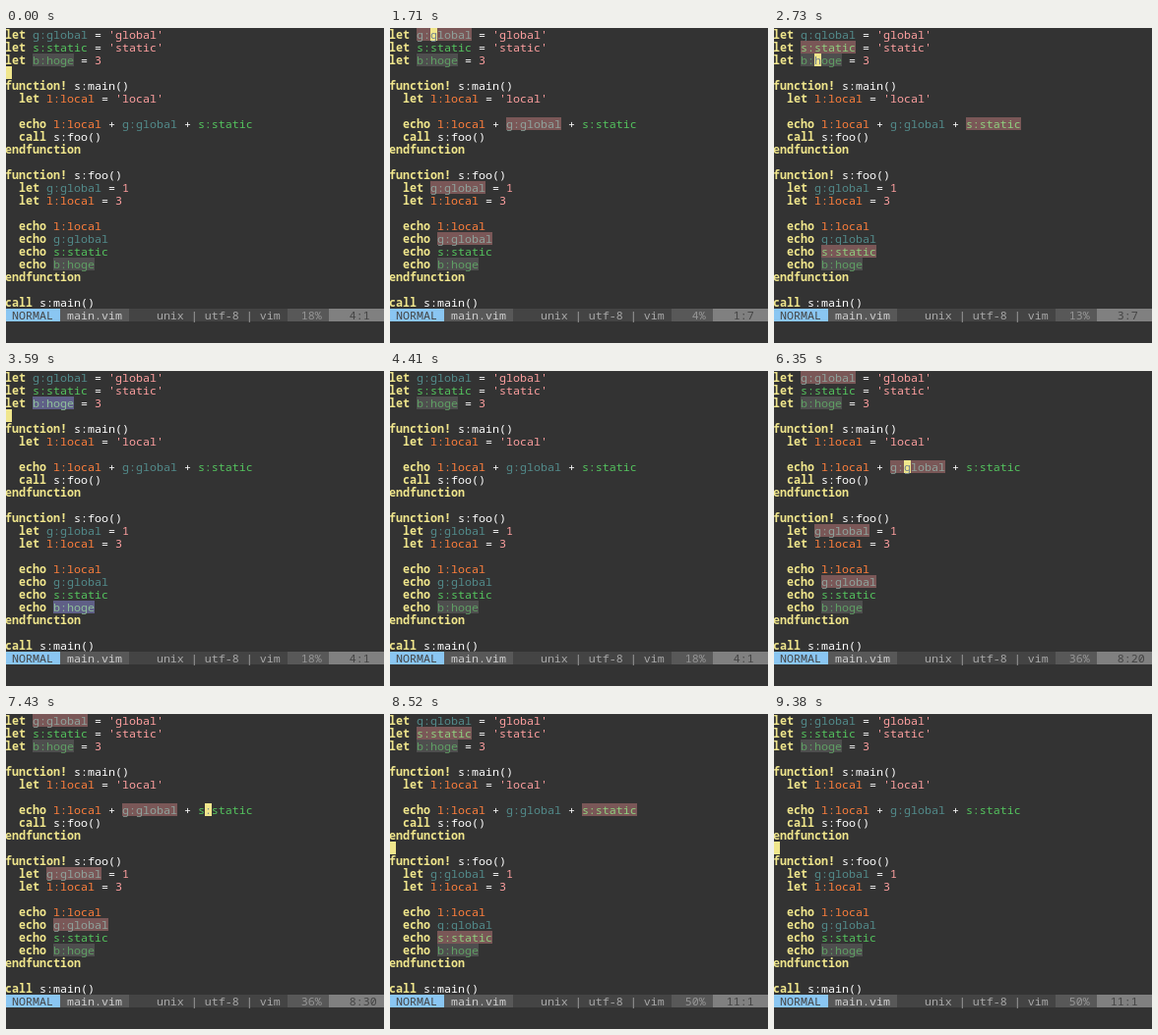
Animation of 384x321 px, one loop 9.71 s. Source, as an HTML page:

```html
<!DOCTYPE html>
<html lang="en">
<head>
<meta charset="utf-8">
<title>Vim variable highlighting</title>
<style>
html, body { margin: 0; width: 100%; height: 100%; overflow: hidden; background: #333; }
pre { position: absolute; left: -1px; margin: 0; color: #fff; white-space: pre;
  font: 11.6667px/13px "Noto Sans Mono", "DejaVu Sans Mono", monospace; }
span { display: inline-block; height: 13px; vertical-align: top; }
.key { color: #f0e68c; font-weight: bold; }
.lit { color: #ffa0a0; }
.g { color: #528b8b; }
.s { color: #54c45e; }
.l { color: #ff7f3c; }
.b { color: #5f9f64; background: #4e4e4e; }
.on { background: #7a5757; }
.g.on { color: #8fa39c; }
.s.on { color: #8fd07f; }
.b.on { background: #5f5f87; color: #8fc09a; }
#cursor { background: #f0e68c; color: #708090; width: 7px; height: 13px; }
#status { top: 286px; }
.mode { background: #8ac6f2; color: #444; }
.file { background: #585858; color: #d0d0d0; }
.info { background: #444; color: #a8a8a8; }
.percent { background: #585858; color: #969696; }
.place { background: #808080; color: #444; }
</style>
</head>
<body>
<pre id="code"></pre>
<pre id="cursor"></pre>
<pre id="status"><span class="mode"> NORMAL </span><span class="file"> main.vim </span><span class="info">    unix | utf-8 | vim </span><span class="percent"></span><span class="place"></span></pre>
<script>
const lines = `let g:global = 'global'
let s:static = 'static'
let b:hoge = 3

function! s:main()
  let l:local = 'local'

  echo l:local + g:global + s:static
  call s:foo()
endfunction

function! s:foo()
  let g:global = 1
  let l:local = 3

  echo l:local
  echo g:global
  echo s:static
  echo b:hoge
endfunction

call s:main()`.split('\n');

const LOOP = 9710;
// [time, line, column, highlighted scope, cursor hidden]
const steps = [
  [0, 4, 1], [220, 4, 1, '', true], [430, 3, 1],
  [860, 2, 1], [1070, 1, 5], [1280, 1, 7], [1710, 1, 7, 'g'],
  [2110, 2, 7, 'g'], [2320, 2, 7, 's'],
  [2730, 3, 7, 's'], [2940, 3, 7, 'b'], [3380, 3, 7, 'b', true],
  [3590, 4, 1, 'b'], [3800, 4, 1], [4210, 4, 1, '', true],
  [4420, 5, 7], [4630, 6, 7], [4840, 6, 7, 'l'],
  [5280, 7, 1, 'l'], [5490, 8, 7, 'l'], [5700, 8, 9, 'l'],
  [5930, 8, 18, 'l'], [6140, 8, 20, 'l'], [6350, 8, 20, 'g'],
  [7000, 8, 26, 'g'], [7210, 8, 28, 'g'], [7420, 8, 30, 'g'], [7630, 8, 30, 's'],
  [8080, 9, 14, 's'], [8290, 10, 11, 's'], [8520, 11, 1, 's'],
  [8730, 11, 1], [9160, 11, 1, '', true], [9380, 11, 1]
];

const $ = selector => document.querySelector(selector);
const token = /(\b(?:let|echo|call|endfunction)\b|function!)|\b([gslb]):\w+\b(?!\()|'\w+'|\b\d\b/g;

$('#code').innerHTML = lines.map((line, row) =>
  line.replace(token, (text, key, scope) => {
    // Locals only light up inside the first function.
    const lit = scope && (scope !== 'l' || row < 10) ? ` data-scope="${scope}"` : '';
    return `<span class="${key ? 'key' : scope || 'lit'}"${lit}>${text}</span>`;
  })).join('\n');

const variables = document.querySelectorAll('[data-scope]');
const cursor = $('#cursor');
let shown;

function show([, line, column, scope, hidden]) {
  variables.forEach(v => v.classList.toggle('on', v.dataset.scope === scope));
  cursor.style.left = (column - 1) * 7 - 1 + 'px';
  cursor.style.top = (line - 1) * 13 + 'px';
  cursor.style.visibility = hidden ? 'hidden' : 'visible';
  cursor.textContent = lines[line - 1][column - 1] || ' ';
  const percent = Math.floor(line * 100 / lines.length);
  $('.percent').textContent = ` ${String(percent).padStart(3)}% `;
  $('.place').textContent = ` ${String(line).padStart(3)}:${String(column).padEnd(2)} `;
}

function tick() {
  const time = performance.now() % LOOP;
  const step = steps.findLast(s => s[0] <= time);
  if (step !== shown) show(shown = step);
  requestAnimationFrame(tick);
}
tick();
</script>
</body>
</html>
```
